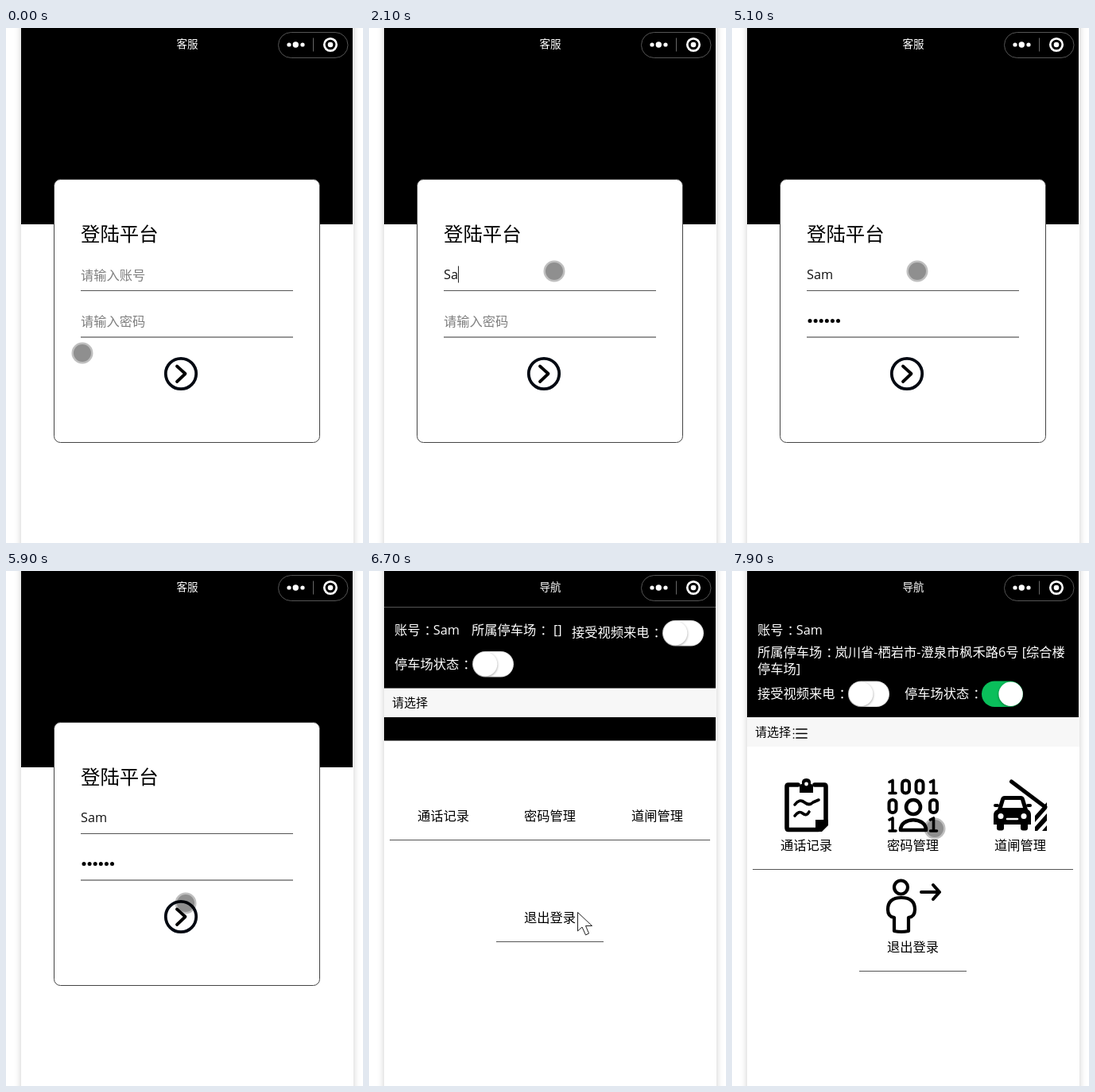
Recreate the animation shown at these times as an HTML page. Size 449x648 px, loop 8000 ms.

```html
<!DOCTYPE html>
<html lang="zh-CN">
<head>
<meta charset="utf-8">
<style>
  html, body { margin: 0; width: 100%; height: 100%; overflow: hidden; background: #fff; }
  svg { display: block; font-family: "Open Sans", "Noto Sans CJK SC", "Noto Sans CJK", sans-serif; }
  .phone { fill: #fff; filter: drop-shadow(0 0 4px #0003); }
  .knob { fill: #fff; filter: drop-shadow(0 1px 1.5px #0006); }
  .line { fill: none; stroke: #000; stroke-linecap: round; stroke-linejoin: round; }
</style>
</head>
<body>
<svg id="stage" width="449" height="648" viewBox="0 0 449 648"></svg>
<script>
const USER = 'Sam';
const SIZE = 16.25;
const LOOP = 8000;

// y is the middle of the line; a full-width colon is centred in its cell
const text = (x, y, s, fill = '#000', size = SIZE, id = '') =>
  `<text ${id && `id="${id}"`} x="${x}" y="${y + size * .38}" font-size="${size}" fill="${fill}">${
    s.replace(/：(.*)/, '<tspan dx=".3em">：</tspan><tspan dx="-.3em">$1</tspan>')}</text>`;
const white = (x, y, s) => text(x, y, s, '#fff');
const rect = (x, y, w, h, fill, extra = '') =>
  `<rect x="${x}" y="${y}" width="${w}" height="${h}" fill="${fill}" ${extra}/>`;
const circle = (x, y, r, extra = '') => `<circle cx="${x}" cy="${y}" r="${r}" ${extra}/>`;
const line = (d, width, extra = '') => `<path class="line" d="${d}" stroke-width="${width}" ${extra}/>`;
const rule = (x, y, w, fill = '#555') => rect(x, y, w, 1, fill);
const header = height => rect(19, 0, 417, height, '#000');
const group = (id, body, extra = '') => `<g id="${id}" ${extra}>${body}</g>`;
const toggle = (x, y, id = '') => group(id, `
  <rect width="52" height="32.5" rx="16.2" fill="#dfdfdf"/>
  <rect x="1" y="1" width="50" height="30.5" rx="15.2" fill="#fff"/>
  <circle class="knob" cx="16.2" cy="16.2" r="15.2"/>`, `transform="translate(${x} ${y})"`);

const one = (x, y) => line(`M${x - 4} ${y - 6}L${x} ${y - 8}V${y + 8}M${x - 4} ${y + 8}H${x + 4}`, 3.6);
const zero = (x, y) => rect(x - 4.5, y - 8, 9, 16, 'none', 'rx="4.200" stroke="#000" stroke-width="4"');

const clipboard =
  line('M83 269H71Q69 269 69 271V323Q69 325.500 71 325.500H108L118 315V271Q118 269 116 269H104', 5.6) +
  '<path d="M105 328V313H121V320L113 328Z"/>' +
  '<path d="M85 279V271Q85 268 88 268Q87 261 93.500 261T99 268Q102 268 102 271V279Z"/>' +
  circle(93.5, 268, 2.4, 'fill="#fff"') +
  line('M79 294Q85 286 91 291T102 291L109 288M79 308Q84 301 89 305T97 303', 3.6);
const binary =
  one(202, 271.5) + zero(218.5, 271.5) + zero(236, 271.5) + one(253.5, 271.5) +
  zero(202, 296) + zero(253.5, 296) + one(202, 319) + one(253.5, 319) +
  circle(228, 297, 9, 'fill="none" stroke="#000" stroke-width="4.600"') +
  line('M212 326C212 309 244 309 244 326Z', 4.6);
const barrier =
  '<path d="M334 300L338 287Q339 283 343 283H363Q367 283 368 287L372 300Q376 302 376 307V319H329V307Q329 302 334 300Z"/>' +
  '<path d="M340 298L343 288H363L366 298Z" fill="#fff"/>' +
  rect(329, 293, 7, 4, '#000', 'rx="2"') + rect(370, 293, 7, 4, '#000', 'rx="2"') +
  circle(338, 308.5, 3.5, 'fill="#fff"') + circle(367, 308.5, 3.5, 'fill="#fff"') +
  line('M346 312H359', 2.5, 'style="stroke:#fff"') +
  rect(333, 316, 9, 10.5, '#000', 'rx="3"') + rect(363, 316, 9, 10.5, '#000', 'rx="3"') +
  line('M351.500 265L394 297', 5) +
  '<path d="M381 308L396 291V299L381 316ZM381 322L396 305V314L384 327H381ZM390 327L396 320V327Z"/>';
const leaving =
  circle(212.5, 398, 8.5, 'fill="none" stroke="#000" stroke-width="4.200"') +
  line('M204 453V436Q196 435 196 426Q196 411 213 411T230 426Q230 435 222 436V453Q213 455 204 453Z', 4.2) +
  line('M238 404H261M253 395L261 404L253 413', 4);

const login =
  header(247) +
  rect(60.5, 190.5, 334, 331, '#fff', 'rx="8" stroke="#444"') +
  text(94, 259, '登陆平台', '#000', 24.4) +
  text(94, 311, '请输入账号', '#808080', SIZE, 'userHint') +
  text(94, 310, '', '#111', SIZE, 'user') + rule(94, 330, 267) +
  text(94, 369, '请输入密码', '#808080', SIZE, 'passHint') +
  group('dots', [0, 1, 2, 3, 4, 5].map(i => circle(98 + 7.1 * i, 368.5, 2.5)).join('')) +
  rule(94, 388.5, 267, '#333') +
  circle(220, 435, 19.2, 'fill="none" stroke="#030912" stroke-width="3.800"') +
  line('M215 425.500L225.500 435L215 445', 3.8) +
  rect(0, 0, 1, 21, '#222', 'id="caret"');

const early =
  header(213.5) + rule(19, 45, 417) +
  white(32, 74, '账号：' + USER) + white(129, 74, '所属停车场：') + white(232, 74, '[]') +
  white(255, 77, '接受视频来电：') + toggle(369, 62) +
  white(32, 117, '停车场状态：') + toggle(130, 101) +
  rect(19, 147.5, 418, 36.5, '#f7f7f7') + text(29, 165, '请选择', '#000', 15);

const late =
  header(184) +
  white(32, 74, '账号：' + USER) +
  white(32, 102, '所属停车场：岚川省-栖岩市-澄泉市枫禾路6号 [综合楼') + white(32, 123, '停车场]') +
  white(32, 154, '接受视频来电：') + toggle(146, 138.5) +
  white(217, 154, '停车场状态：') + toggle(314, 138.5, 'parking') +
  rect(19, 184, 418, 37, '#f7f7f7') + text(29, 202, '请选择', '#000', 15) +
  group('icons', clipboard + binary + barrier + leaving +
    [199, 204.5, 210].map(y => line(`M81 ${y}H94M77.500 ${y}H77.600`, 1.7)).join(''));

const menu =
  text(61, 308, '通话记录') + text(195, 308, '密码管理') + text(330, 308, '道闸管理') + rule(26, 338, 403) +
  text(195, 436, '退出登录') + rule(160, 466, 135);

const capsule =
  rect(342.5, 5.5, 87.5, 32, '#000', 'rx="16" stroke="#555"') +
  `<g fill="#fff">${circle(356, 21, 2.6)}${circle(364.3, 21, 3.7)}${circle(373, 21, 2.6)}${circle(408, 21, 3.3)}</g>` +
  rect(386, 12.5, 1, 17, '#666') +
  circle(408, 21, 7.7, 'fill="none" stroke="#fff" stroke-width="2.700"');

const pointer =
  group('touch', circle(0, 0, 13.5, 'opacity=".25"') + circle(0, 0, 11, 'opacity=".25"')) +
  group('arrow', '<path d="M.5 .5V24L6 19L10.500 29L14.500 27L10.500 17.500H18.500Z" fill="#fff" stroke="#222"/>') +
  group('beam', line('M-5 -9.500H-2Q0 -9.500 0 -7.500V7.500Q0 9.500 -2 9.500H-5M5 -9.500H2Q0 -9.500 0 -7.500M0 7.500Q0 9.500 2 9.500H5', 1.6));

const $ = id => document.getElementById(id);
$('stage').innerHTML =
  '<rect class="phone" x="19" y="-20" width="418" height="690"/>' +
  group('login', login) + group('early', early) + group('late', late) + group('menu', menu) +
  text(214.5, 20, '', '#fff', 13.5, 'title') + capsule + group('pointer', pointer);

const path = [
  [0, 96, 409], [400, 233, 304.5], [1200, 233, 304.5], [1300, 233, 306], [5200, 233, 306],
  [5600, 250, 464], [5900, 226, 418], [6000, 226, 418], [6300, 262, 429], [6900, 262, 429],
  [7200, 270, 432], [7300, 270, 432], [7500, 277, 407], [7900, 255, 324], [LOOP, 255, 324]
];
const userKeys = [1700, 2100, 2400];
const passKeys = [3100, 3400, 3700, 4000, 4300, 4500];

const show = (id, on) => $(id).setAttribute('display', on ? 'inline' : 'none');
const within = (t, a, b) => t >= a && t < b;
const progress = (t, a, b) => Math.min(1, Math.max(0, (t - a) / (b - a)));
const typed = (keys, t) => keys.filter(k => t >= k).length;

function position(t) {
  const i = path.findIndex(p => p[0] > t);
  const [t0, x0, y0] = path[i - 1], [t1, x1, y1] = path[i];
  const k = progress(t, t0, t1);
  return `translate(${x0 + (x1 - x0) * k} ${y0 + (y1 - y0) * k})`;
}

function drawLogin(t) {
  const letters = typed(userKeys, t), dots = typed(passKeys, t);
  $('user').textContent = USER.slice(0, letters);
  show('userHint', !letters);
  show('passHint', !dots);
  [...$('dots').children].forEach((dot, i) => dot.setAttribute('display', i < dots ? 'inline' : 'none'));

  const inUser = within(t, 600, 1100) || within(t, 1600, 2600);
  const inPass = within(t, 2600, 5100) || within(t, 5600, 5800);
  show('caret', inUser || inPass);
  $('caret').setAttribute('x', inPass ? 94 + 7.1 * dots : 94 + (letters && $('user').getComputedTextLength()));
  $('caret').setAttribute('y', inPass ? 358 : 299.5);
}

function drawParking(t) {
  const k = progress(t, 7490, 7800);
  const eased = k * k * (3 - 2 * k);
  const [track, cover, knob] = $('parking').children;
  track.style.fill = `color-mix(in srgb, #0abf5b ${100 * progress(t, 7460, 7560)}%, #dfdfdf)`;
  cover.setAttribute('transform', `translate(26 16.2) scale(${1 - eased}) translate(-26 -16.2)`);
  knob.setAttribute('cx', 16.2 + 20.4 * eased);
}

function draw(now) {
  const t = Math.floor(now % LOOP / 100) * 100;
  show('login', t < 6600);
  show('early', within(t, 6600, 7400));
  show('late', t >= 7400);
  show('menu', t >= 6600);
  show('icons', t >= 7700);
  $('menu').setAttribute('transform', `translate(0 ${t < 7400 ? 0 : 37})`);
  $('title').textContent = t < 6600 ? '客服' : '导航';
  drawLogin(t);
  drawParking(t);

  const arrow = within(t, 6300, 7500), beam = within(t, 7500, 7700);
  show('arrow', arrow);
  show('beam', beam);
  show('touch', !arrow && !beam);
  $('pointer').setAttribute('transform', position(t));
}

const start = performance.now();
function tick() {
  draw(performance.now() - start);
  requestAnimationFrame(tick);
}
tick();
</script>
</body>
</html>
```
